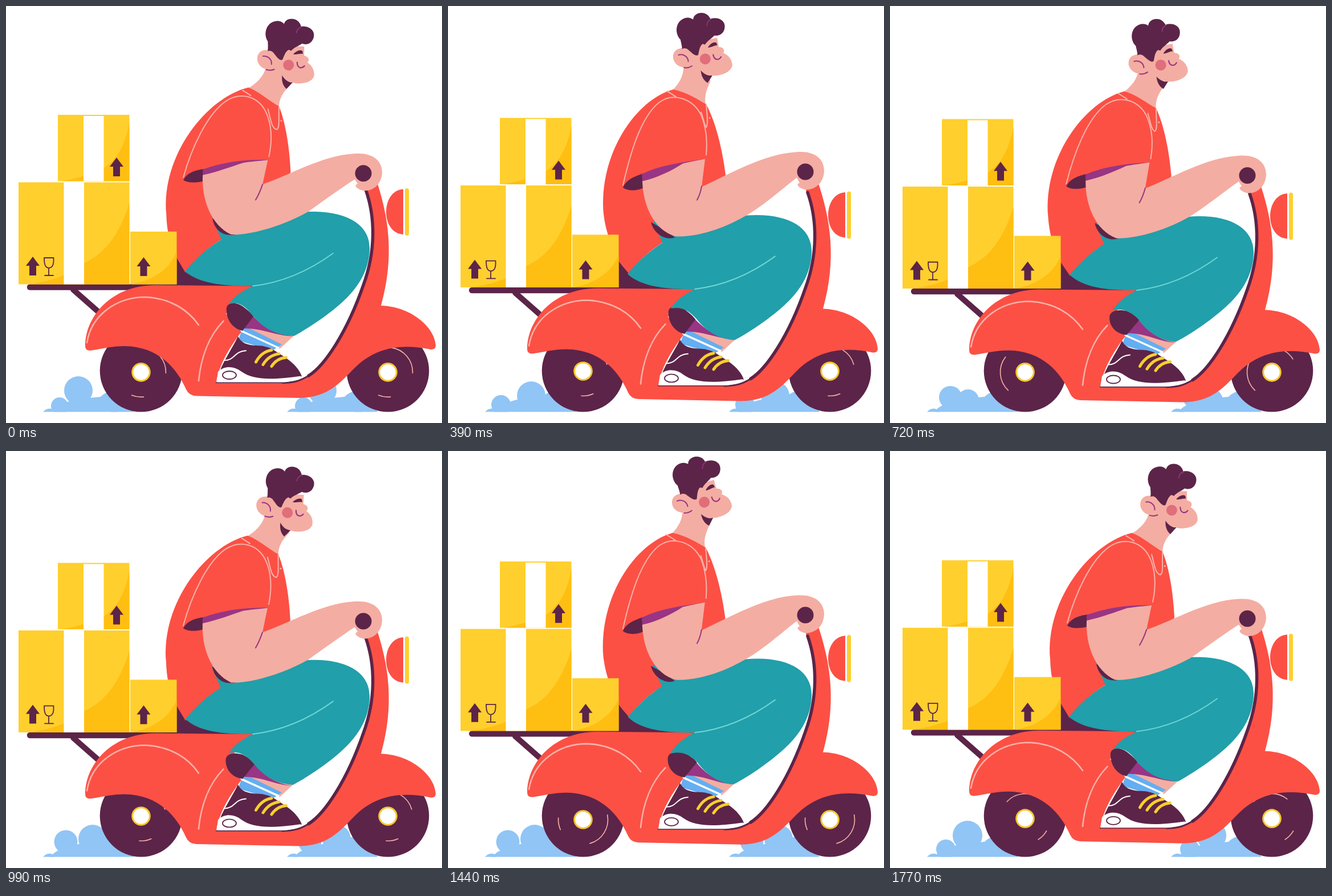
Recreate the animation shown at these times as an HTML page with a canvas. Size 765 px wide and 732 px high, loop 1.8 s.

```html
<!DOCTYPE html>
<html lang="en">
<head>
<meta charset="utf-8">
<title>Delivery ride</title>
<style>
html, body { margin: 0; width: 100%; height: 100%; overflow: hidden; background: #fff; }
canvas { display: block; }
</style>
</head>
<body>
<canvas id="stage" width="765" height="732"></canvas>
<script>
const ctx = document.getElementById('stage').getContext('2d');
const LOOP = 1800, STEP = 30, TAU = Math.PI * 2;
const RED = '#fc5045', DARK = '#5c2448', SKIN = '#f4ada2', TEAL = '#219faa',
  PLUM = '#983584', YELLOW = '#ffcf2d', AMBER = '#ffbe12', PINK = '#f8b2a8',
  BLUE = '#64aef1', CLOUD = '#90c5f5', WHITE = '#fff';

const lerp = (a, b, k) => a + (b - a) * k;
const wave = (t, peak, period) => Math.cos(TAU * (t - peak) / period);

function fill(d, color) {
  ctx.fillStyle = color;
  ctx.fill(new Path2D(d));
}
function line(d, color, width) {
  ctx.strokeStyle = color;
  ctx.lineWidth = width;
  ctx.stroke(new Path2D(d));
}
function rect(x, y, w, h, color) {
  ctx.fillStyle = color;
  ctx.fillRect(x, y, w, h);
}
function disc(x, y, r, color) {
  ctx.fillStyle = color;
  ctx.beginPath();
  ctx.arc(x, y, r, 0, TAU);
  ctx.fill();
}
// Blends two paths that share the same commands.
function mix(a, b, k) {
  const to = b.match(/-?[\d.]+/g);
  let i = 0;
  return a.replace(/-?[\d.]+/g, n => lerp(+n, +to[i++], k).toFixed(2));
}

// Puff tracks: time, x, y, radius
const PUFFS = [
  [[0, 190, 700, 14], [90, 152, 681, 25], [270, 106, 687, 20], [390, 93, 700, 17],
   [420, 98, 699, 17], [450, 94, 702, 15], [540, 80, 712, 4]],
  [[180, 160, 700, 14], [270, 137, 692, 19], [390, 146, 684, 25], [420, 136, 675, 26],
   [450, 127, 675, 25], [540, 105, 686, 20.5], [720, 84, 712, 4]]
];
function puff(track, t) {
  const i = track.findIndex((k, n) => n && t <= k[0]);
  if (i < 1 || t < track[0][0]) return;
  const a = track[i - 1], b = track[i], k = (t - a[0]) / (b[0] - a[0]);
  disc(lerp(a[1], b[1], k), lerp(a[2], b[2], k), lerp(a[3], b[3], k), CLOUD);
}
function cloud(x, t) {
  ctx.save();
  ctx.translate(x, 0);
  ctx.beginPath();
  ctx.rect(0, 560, 260, 152.5);
  ctx.clip();
  const p = t % 450;
  for (const track of PUFFS) {
    puff(track, p);
    puff(track, p + 450);
  }
  fill('M65 713C70 706 78 706 82 708C88 702 98 698 108 695C122 689 148 688 166 686C173 679 180 676 190 675L225 713Z', CLOUD);
  ctx.restore();
}

function wheel(x, t) {
  const hub = 644 + 3.8 * wave(t, 210, 300);
  const turn = t / 200 * 360;
  disc(x, 640.3, 72.3, DARK);
  ctx.strokeStyle = PINK;
  ctx.lineWidth = 1.6;
  for (const [from, to] of [[-83, 2], [84, 112]]) {
    ctx.beginPath();
    ctx.arc(x, hub, 43.5, (turn + from) * TAU / 360, (turn + to) * TAU / 360);
    ctx.stroke();
  }
  disc(x, hub, 16.8, '#f5c62c');
  disc(x, hub, 13.8, WHITE);
}

function arrow(x, y) {
  fill(`M${x} ${y}l12 16h-6v17h-12v-17h-6Z`, DARK);
}

function boxes() {
  rect(91, 191, 125.5, 116.5, YELLOW);
  fill('M216.5 205C208 249 193 271 171 285C150 296 125 302 98 307.5H216.5Z', AMBER);
  rect(136, 193, 35.5, 114.5, WHITE);
  arrow(194, 266);

  rect(22, 309.5, 194.5, 179, YELLOW);
  fill('M216.5 345C202 394 177 434 137 451C112 472 80 483 40 488.5H216.5Z', AMBER);
  rect(101.5, 309, 35.5, 179.5, WHITE);
  arrow(47, 440);
  line('M67 442H83.5C84 454 82 459 75 460C69 459 67 454 67 442M75 460V472M68 473H83', DARK, 1.8);

  rect(218, 396, 81.5, 92.5, YELLOW);
  fill('M299.5 431C288 460 261 481 220 488.5H299.5Z', AMBER);
  arrow(241.5, 441);
}

function scooter() {
  line('M118 498L168 542', DARK, 10);
  line('M42 493.5H300', DARK, 10.5);
  fill('M299 440C316 470 350 486 432 491V500H240V489H299Z', DARK);
  fill('M139 597C139 545 185 490 262 490L432 491.5L386 540L413 572C390 602 373 633 369 661' +
    'H485C505 661 515 658 530 649C559 630 598 570 627 490C648 430 647 370 628 318' +
    'L632 300H648C672 370 682 440 658 526C708 527 752 562 754 596Q754 603 746 603' +
    'C690 591 646 601 611 636C587 660 566 688 513 688L334 684.5Q321 684 316 673' +
    'C300 636 268 598 208 597C186 597 168 602 150 604.5Q139 606 139 597Z', RED);
  line('M631 322C648 370 649 430 627 490C599 571 560 631 531 649', DARK, 5.5);
  line('M531 649C516 658 506 661 485 661.5', DARK, 3);
  line('M369 661H487', DARK, 2);
  line('M142 591C150 542 194 511 245 511C289 513 320 534 338 560', PINK, 2.6);
  line('M381.5 553C356 579 342 617 338 658', PINK, 2.6);
  fill('M697 321.5C657 324 657 399 697 401Z', RED);
  line('M703.5 323.5V399.5', YELLOW, 7);
}

function foot(q) {
  fill('M417 558L505 579L480 602L425 580Z', SKIN);
  fill('M417 561L484 594L467 605L407 587Z', BLUE);
  line('M414 571L478 600', WHITE, 3.5);
  fill('M407 580C412 591 424 596 440 596C451 596 460 599 467 602L490 617' +
    'C508 629 516 641 519 650C480 662 440 662 371 652C379 626 396 603 407 580Z', DARK);
  fill('M369.5 660.5L372 642C385 629 403 634 412 641C435 658 470 656 518 649.5C511 658 496 660.5 482 660.5Z', WHITE);
  ctx.strokeStyle = DARK;
  ctx.lineWidth = 1.8;
  ctx.beginPath();
  ctx.ellipse(392, 648, 12, 7, 0, 0, TAU);
  ctx.stroke();
  line('M383 622C402 622 400 606 421 605', WHITE, 2);
  line('M438.5 625C445 613 454 606 466 604M451 629.5C458 618 467 612 479 610.5M466 632.5C472 623 480 618 491.5 617', '#f7cf2b', 5);

  fill(mix('M432 543C452 565 476 577 506 579C480 581 450 565 416 566Z',
    'M435 541C450 563 476 581 501 583C476 584 450 566 416 567Z', q), PLUM);
  fill(mix('M387 534C385 520 402 518 415 527C424 534 431 540 434 545L415 570C398 567 387 550 387 534Z',
    'M385 540C385 526 402 525 416 528C427 533 434 538 438 543L415 570C396 568 385 555 385 540Z', q), DARK);
}

function pants(q, lean) {
  fill(mix('M314 466C331 445 355 423 378 410L362 373L460 362L530 361C592 359 638 380 638 425' +
    'C638 468 612 500 590 520C568 540 535 563 506 579C475 578 453 567 434 545' +
    'C423 530 410 518 392 522C402 507 420 498 433 491.5C385 492 340 488 314 466Z',
    'M316 464C332 444 355 423 375 410L358 374L460 366L520 363C592 356 638 380 638 425' +
    'C638 468 612 500 590 520C568 540 532 567 500 583C475 581 453 565 437 542' +
    'C424 530 410 524 390 529C401 510 420 498 433 491.5C385 492 340 488 316 464Z',
    lerp(lean, q, 0.5)), TEAL);
  line('M433 491.5C482 486 530 466 574 434', '#6fd5d5', 2);
}

function torso(k) {
  fill(mix('M455 104C452 123 437 137 422 145L478 180C477 163 485 150 497 139L492 95Z',
    'M413 100C413 117 406 130 393 143L453 172C448 152 454 141 460 127L456 84Z', k), SKIN);
  fill(mix('M424 143C351 161 272 262 281 365C282 400 290 425 300 443L315 468C331 446 355 423 378 410' +
    'L440 360L499 292C497 250 490 205 478 176C462 167 443 150 424 143Z',
    'M395 141C329 159 264 255 273 360C277 395 290 422 300 443L317 464C332 444 355 423 376 410' +
    'L440 360L487 291C481 245 470 200 453 167C440 160 420 146 395 141Z', k), RED);
  line(mix('M414 148Q421 152 428 157M311 301C325 250 352 190 385 167C411 150 441 158 455 185C466 207 467 236 461 264',
    'M384 144Q392 149 400 154M307 309C320 252 338 190 370 164C396 145 430 158 444 186C453 208 455 234 453 256', k), PINK, 2);
  line(mix('M459 181C464 199 465 214 474 216.5C480 214 477 194 478 177',
    'M444 181C449 195 450 204 453 207.5C457 200 454 184 453 168', k), PINK, 2);
  disc(lerp(482, 459, k), lerp(201, 191, k), 1.5, PINK);
}

function arm(k) {
  fill(mix('M362 373C379 382 389 392 402 401C384 405 366 396 362 373Z',
    'M356 374C372 383 386 390 398 401C382 406 362 396 356 374Z', k), DARK);
  fill(mix('M311 306C317 293 332 288 348 286L352 306C338 311 320 312 311 306Z',
    'M307 313C312 300 326 294 344 288L348 311C334 320 315 320 307 313Z', k), DARK);
  fill(mix('M345 287C381 274 417 269 460 270C424 276 387 289 345 299Z',
    'M340 290C368 275 404 270 451 263C418 271 382 288 341 305Z', k), PLUM);
  fill(mix('M345 297C372 291 395 282 416 275C438 272 453 271 459 270L450 313' +
    'C497 297 555 262 610 259C642 256 660 270 660 292C659 312 645 325 628 324C614 321 610 314 617 312' +
    'L612 304C590 318 560 340 530 361C490 384 430 403 395 401C360 385 343 340 345 297Z',
    'M341 302C368 296 392 284 412 271C434 266 445 264 451 263L445 312' +
    'C493 290 555 254 610 251C642 248 660 262 660 284C659 305 645 317 628 317C614 314 610 307 617 305' +
    'L612 296C590 312 555 345 520 364C480 387 436 400 400 399C362 389 342 345 341 302Z', k), SKIN);
  line(mix('M450 313Q445 328 438 340', 'M445 311Q443 324 437 335', k), PLUM, 2);
  disc(627, lerp(293.5, 285.5, k), 14.5, DARK);
}

function head(k, angle) {
  ctx.save();
  ctx.translate(lerp(494, 451, k), lerp(103, 87.5, k));
  ctx.rotate(angle * TAU / 360);
  ctx.translate(-494, -103);
  fill('M483 121C488 130 495 134 502 133L491 145C484 139 482 130 483 121Z', DARK);
  fill('M460 70H521V86C530 88 531 95 527 98C537 104 540 114 539 122C535 133 520 136 507 135' +
    'C495 133 486 127 483 121L470 122L455 112Z', SKIN);
  fill('M469 82C452 71 437 80 439 95C442 110 458 115 468 108Z', SKIN);
  line('M449 88C458 87 465 94 464 102M455 111.5Q462 114 469 111', PLUM, 2);
  fill('M457 79C458 72 457 66 457 62C448 49 454 27 473 26C479 26 482 28 485 31C488 18 511 18 515 35' +
    'C529 33 540 42 537.5 53C535 65 525 68 517 65C512 69 503 72 498 78L494 76C488 79 486 87 483 94' +
    'C478 96 474 90 469 84C466 79 461 77 457 79Z', DARK);
  line('M507 46C508 40 511 37 516 36', PLUM, 1.6);
  fill('M502 84C507 78 514 75 518 78L519 83C514 82 508 85 502 84Z', DARK);
  line('M509 98C509 108 517 110 522 104', PLUM, 2.2);
  disc(494, 103, 9.5, '#e06e7b');
  ctx.restore();
}

function draw(t) {
  const bob = 4.15 * (1 - wave(t, 0, 300));
  const lean = 0.52 - 0.57 * wave(t, 25, 900);
  const flap = 0.65 * (1 - wave(t, -30, 450));
  const nod = 9.8 * wave(t, 110, 900) - 6.2;

  rect(0, 0, 765, 732, WHITE);
  ctx.lineCap = 'round';
  ctx.lineJoin = 'round';
  cloud(0, t);
  cloud(428, t);
  wheel(237, t);
  wheel(670, t);

  ctx.save();
  ctx.translate(0, bob);
  scooter();
  torso(lean);
  foot(flap);
  pants(flap, lean);
  arm(lean);
  head(lean, nod);
  boxes();
  ctx.restore();
}

const start = performance.now();
function tick() {
  const t = (performance.now() - start) % LOOP;
  draw(Math.floor(t / STEP) * STEP);
  requestAnimationFrame(tick);
}
tick();
</script>
</body>
</html>
```
